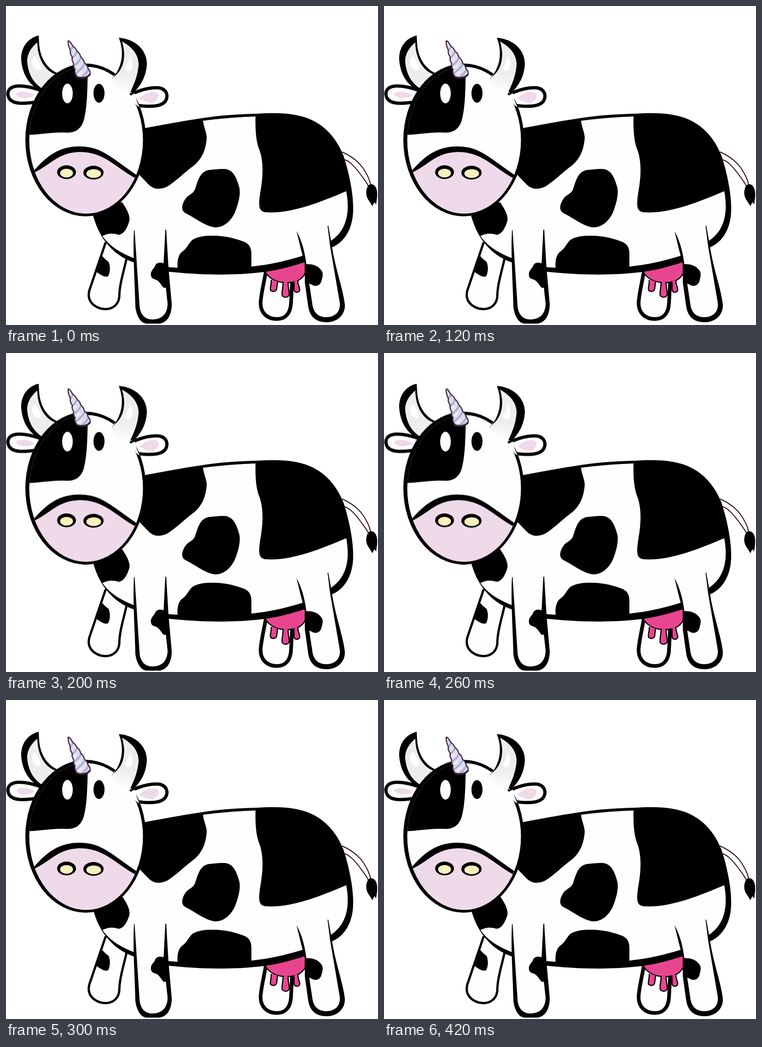
Write an HTML page that moves like this. It is 808 px wide and 693 px high and loops after 0.5 s.

```html
<!DOCTYPE html>
<html lang="en">
<head>
<meta charset="utf-8">
<title>Nodding cow</title>
<style>
html, body { margin: 0; width: 100%; height: 100%; overflow: hidden; background: #fff; }
svg { display: block; width: 808px; height: 693px; }
.w { fill: #fefefe; }
.pink { fill: #efdae9; }
.udder { fill: #e8458f; stroke: #000; stroke-width: 2.5; }
.limb { fill: #fefefe; stroke: #000; stroke-linecap: round; }
.hair { fill: none; stroke: #2b0618; stroke-width: 2; }
#head { animation: nod 500ms step-end infinite; }
@keyframes nod {
  0% { transform: translateY(0); }
  40% { transform: translateY(2.5px); }
  60%, 100% { transform: translateY(5px); }
}
</style>
</head>
<body>
<svg viewBox="0 0 808 693">
  <defs>
    <linearGradient id="ivory" gradientUnits="userSpaceOnUse" x1="275" y1="110" x2="256" y2="188">
      <stop offset="0" stop-color="#eceeed"/><stop offset=".5" stop-color="#eceeed"/><stop offset="1" stop-color="#fefefe"/>
    </linearGradient>
    <clipPath id="face"><ellipse cx="174" cy="291.5" rx="123.500" ry="159.500"/></clipPath>
    <clipPath id="spire"><path id="cone" d="M135 76C138 75 141 80 145 87Q152 92 154 98Q161 103 162 110Q169 116 170 123Q178 130 178 136Q185 143 182 149Q176 157 164 156Q154 157 152 150Q148 144 150 138Q145 131 147 125Q142 117 144 111Q138 103 140 97Q134 84 135 76Z"/></clipPath>
  </defs>

  <!-- tail -->
  <path class="hair" d="M730 317C752 327 766 338 776 353C784 366 790 376 792 389M736 334C748 338 758 350 768 363C776 374 783 382 787 391"/>
  <path d="M794 387C801 388 805 395 806 404C807 414 805 422 804 431L800 426L796 435L789 424C782 415 781 405 784 396C786 390 789 387 794 387Z"/>

  <!-- far legs -->
  <path class="limb" stroke-width="5" d="M216 515L181 618C176 637 186 651 205 657C226 662 243 653 246 633C246 605 256 576 262 548"/>
  <path d="M209 543C213 548 218 552 223 556C228 570 225 580 222 587C214 590 207 585 197 578Z"/>
  <path class="limb" stroke-width="8" d="M565 574C560 603 554 625 553 645C553 667 567 680 589 680C608 680 618 666 619 646L622 590"/>

  <!-- udder -->
  <path class="udder" d="M562 575C570 592 585 599 604 601C626 602 643 596 650 580V555Z"/>
  <g class="udder">
    <path d="M576 595C577 606 572 614 575 618C580 622 587 620 588 614L590 598"/>
    <path d="M602 599C602 611 598 624 600 629C604 634 612 634 615 628C616 619 612 612 613 600"/>
    <path d="M625 599C627 607 624 616 627 620C632 624 638 621 638 616C637 608 633 603 634 595"/>
  </g>

  <!-- body -->
  <path d="M250 277L303 265C345 257 390 249 430 243C470 237 510 235 545 234C575 232 603 232 625 236C684 245 716 283 733 325C745 361 755 410 754 442C754 482 736 514 706 525L648 557C610 569 580 576 550 579C480 587 410 583 350 577L281 558C240 546 205 512 190 458Z"/>
  <path class="w" d="M250 284L303 271C345 263 390 255 430 249C470 244 510 241 543 240L730 345L739 402C748 450 739 488 706 510L643 543C605 555 570 562 534 566C470 572 405 572 350 567L281 549C247 536 224 521 209 499L250 425Z"/>
  <path d="M290 268L428 249C429 263 436 274 436 287C434 312 426 331 410 345C388 361 368 382 349 393C332 400 320 398 309 387L285 362Z"/>
  <path d="M443 356C454 355 462 354 472 354C493 353 501 373 507 395C510 411 504 431 497 449C488 468 473 481 454 481C432 478 412 461 390 450C379 444 382 431 389 420C397 408 406 410 411 397C418 375 423 358 443 356Z"/>
  <path d="M373 573C371 553 374 539 385 532C394 525 396 516 405 508C418 500 433 499 450 499C477 499 497 505 514 511C529 516 533 526 533 538V572Z"/>
  <path d="M542 238C541 275 544 298 551 314C561 344 557 379 552 407C548 435 549 446 563 448C620 452 680 427 740 402L730 320C705 262 660 238 610 236Z"/>
  <path d="M189 456L252 426C264 443 270 457 268 467C262 486 255 496 244 497C230 493 222 494 209 500Z"/>

  <!-- near front leg -->
  <path d="M278 487C275 540 280 600 281 654C284 676 294 690 306 690H333C351 688 360 670 360 648L353 570L348 486H346Z"/>
  <path class="w" d="M280 476L279.500 490L290 650C291 669 301 681 318 681C340 681 351 667 351 646L342 565L346 487V476Z"/>
  <path d="M347 540L352 612H342C337 606 332 596 324 594C315 592 314 586 315 579C318 571 322 570 324 564C327 557 335 556 342 559Z"/>

  <!-- near hind leg -->
  <path d="M631 489L641 530L649 560V600L656 650C659 675 673 687 697 687C721 687 737 670 736 649C733 617 715 570 708 522L700 477Z"/>
  <path class="w" d="M632 480L631 489C645 515 650 540 653 566L665 645C667 666 678 676 696 676C716 676 727 663 725 645L704 522L698.500 478L698 470Z"/>
  <path d="M650 561C662 560 676 563 682 571C689 577 689 584 686 594C684 606 676 610 667 607C662 604 658 602 652 602Z"/>

  <g id="head">
    <!-- ears -->
    <path class="limb" stroke-width="7" d="M78 184C57 177 42 173 23 174C6 176 1 187 6 199C13 214 38 213 69 208"/>
    <path class="pink" d="M22 190C30 183 50 186 62 194C52 202 25 204 22 190Z"/>
    <path class="limb" stroke-width="7" d="M276 190C297 180 319 176 334 178C350 182 353 196 346 207C336 220 309 219 286 216"/>
    <path class="pink" d="M289 201C301 188 322 182 330 190C335 196 328 207 319 210C308 211 299 206 289 201Z"/>

    <!-- left horn -->
    <path d="M71 64C46 70 32 91 33 117C36 151 51 173 80 187L114 147C88 136 74 112 72 82Z"/>
    <path fill="#eceeed" d="M68 79C54 91 46 104 46 120C48 149 61 169 80 180L109 149C83 141 68 111 68 79Z"/>
    <path class="w" d="M63 108C67 113 70 120 75 128C79 137 71 143 64 137C55 130 54 116 63 108Z"/>

    <!-- skull -->
    <ellipse cx="173" cy="291" rx="131" ry="166"/>
    <g clip-path="url(#face)">
      <path class="w" d="M40 120H310V470H40Z"/>
      <path d="M40 280C75 280 100 273 130 275C150 276 163 268 169 248C176 222 177 190 178 120H40Z"/>
      <path class="pink" d="M50 366C100 320 120 314 160 314C210 315 235 338 295 378V470H50Z"/>
      <path d="M50 371C88 322 118 305 160 305C211 306 226 329 300 378L281 374C239 352 214 317 160 317C112 319 98 344 63 361Z"/>
    </g>

    <!-- right horn, blending into the brow -->
    <path class="w" d="M232 154L246 138L292 170L277 190L290 220L284 216L260 184Z"/>
    <path d="M245 69C283 72 306 97 306 126C304 157 291 175 272 194L268 190L230 158C250 137 259 104 245 69Z"/>
    <path fill="url(#ivory)" d="M252 77C278 91 288 109 288 127C286 153 279 167 269 190L257 196L228 162L233 155C256 139 262 109 252 77Z"/>
    <path class="w" d="M268 108C276 116 277 135 270 140C262 144 256 137 260 130C266 122 268 116 268 108Z"/>
    <path class="w" d="M270 187L280 190L286 214L275 206Z"/>
    <path class="limb" stroke-width="4" d="M271 192L280 187"/>

    <!-- eyes and nostrils -->
    <ellipse class="w" cx="133.500" cy="190" rx="11.500" ry="21.500"/>
    <ellipse cx="202" cy="189.500" rx="12" ry="20.500"/>
    <ellipse cx="131.500" cy="361" rx="20.500" ry="15"/>
    <ellipse cx="131.500" cy="363" rx="14" ry="9.500" fill="#f9f1bd"/>
    <ellipse cx="190" cy="362" rx="22" ry="15"/>
    <ellipse cx="190.500" cy="364" rx="16" ry="9.500" fill="#f9f1bd"/>

    <!-- spiral horn -->
    <use href="#cone" fill="#dddeea"/>
    <g clip-path="url(#spire)" fill="none" stroke="#a9abdc" stroke-width="4">
      <path d="M136 98Q144 94 147 84M141 115Q151 108 156 96M145 132Q160 122 165 108M149 148Q167 137 173 121M160 158Q174 149 181 135"/>
      <path stroke="#f1ece6" stroke-width="5" d="M147 118L153 113M153 134L160 128M158 149L166 142"/>
    </g>
    <use href="#cone" fill="none" stroke="#4b2a42" stroke-width="2.600"/>
    <path fill="none" stroke="#3a2030" stroke-width="4" stroke-linecap="round" d="M152 152Q155 156 164 156Q176 156 182 149"/>
  </g>
</svg>
</body>
</html>
```
